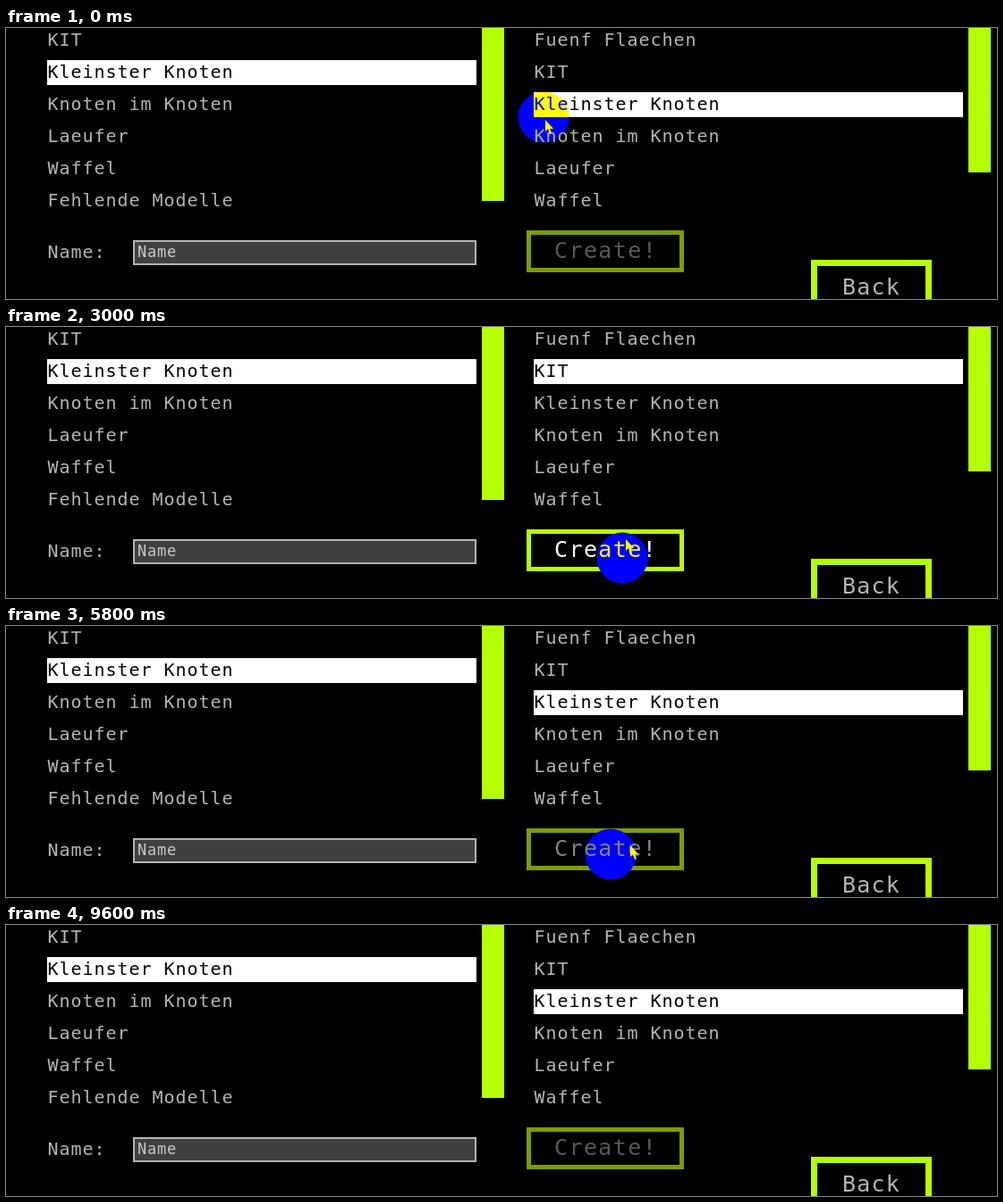
An HTML page with a canvas for the animation above (9.7 s loop, 1108x304 px).

```html
<!DOCTYPE html>
<html lang="de">
<head>
<meta charset="utf-8">
<style>
  html, body { margin: 0; width: 100%; height: 100%; overflow: hidden; background: #000; }
  canvas { display: block; }
</style>
</head>
<body>
<canvas id="stage" width="1108" height="304"></canvas>
<script>
const ctx = document.getElementById('stage').getContext('2d');
const LOOP = 9700, STEP = 100, ROW = 36, BAR = 28;
const LIME = '#b4ff00', DIM_LIME = '#7c9c00', GRAY = '#b4b4b4';
const MODELS = ['Fuenf Flaechen', 'KIT', 'Kleinster Knoten', 'Knoten im Knoten', 'Laeufer', 'Waffel', 'Fehlende Modelle'];

// Each click toggles the right list between "Kleinster Knoten" and "KIT"
const CLICKS = [900, 1900, 2400, 4800];

// Pointer stops: time, x, y
const STOPS = [
  [-100, 601, 100], [0, 603, 103], [900, 612, 50], [1800, 638, 88], [1900, 638, 91],
  [2400, 608, 46], [2900, 689, 259], [3000, 693, 238], [4000, 689, 244], [4100, 692, 252],
  [4800, 612, 87], [5700, 676, 256], [5800, 698, 246], [8000, 699, 270], [8100, 700, 244],
  [9300, 672, 345]
];

// Eases between stops; on long legs the pointer also circles about once a second
function pointerAt(t) {
  const i = STOPS.findIndex(stop => stop[0] > t);
  if (i < 0) return STOPS[STOPS.length - 1].slice(1);
  const [t0, x0, y0] = STOPS[i - 1], [t1, x1, y1] = STOPS[i];
  const u = (t - t0) / (t1 - t0), e = u * u * (3 - 2 * u);
  const turn = 2 * Math.PI * Math.floor((t1 - t0) / 1000) * u;
  return [
    x0 + (x1 - x0) * e - 25 * (1 - Math.cos(turn)),
    y0 + (y1 - y0) * e - 28 * Math.sin(turn)
  ];
}

function rect(x, y, w, h, color) {
  ctx.fillStyle = color;
  ctx.fillRect(x, y, w, h);
}

function frame(x, y, w, h, border, color, fill = '#000') {
  rect(x, y, w, h, color);
  rect(x + border, y + border, w - 2 * border, h - 2 * border, fill);
}

function label(text, x, y, color, size = 20, spacing = 0.96) {
  ctx.font = `${size}px "DejaVu Sans Mono", monospace`;
  ctx.letterSpacing = spacing + 'px';
  ctx.fillStyle = color;
  ctx.fillText(text, x, y);
}

function list(items, x, selected, hovered) {
  items.forEach((item, i) => {
    if (i === selected) rect(x, ROW * i, 480, BAR, '#fff');
    label(item, x + 0.5, ROW * i + 20, i === selected ? '#000' : i === hovered ? '#fff' : GRAY);
  });
}

function disc(x, y, r, color) {
  ctx.beginPath();
  ctx.arc(x, y, r, 0, 2 * Math.PI);
  ctx.fillStyle = color;
  ctx.fill();
}

function ring(x, y) {
  ctx.beginPath();
  ctx.arc(x, y, 6, 0, 2 * Math.PI);
  ctx.strokeStyle = '#f00';
  ctx.lineWidth = 2.5;
  ctx.stroke();
}

function arrow(x, y) {
  ctx.fillStyle = '#ff0';
  ctx.fill(new Path2D(`M${x} ${y}v13l3-3 2 6 2-1-2-5h4z`));
}

function draw(t) {
  const [x, y] = pointerAt(t), [haloX, haloY] = pointerAt(t - STEP);
  const visible = t < 9300;
  const kitSelected = CLICKS.filter(click => click < t).length % 2 === 1;
  const hovered = y % ROW < BAR ? Math.floor(y / ROW) : -1;
  const onCreate = x > 582 && x < 758 && y > 227 && y < 274;

  rect(0, 0, 1108, 304, '#000');
  rect(532, 0, 25, 194, LIME);
  rect(1076, 0, 25, 162, LIME);
  frame(142, 238, 384, 28, 2, GRAY, '#404040');
  frame(582, 227, 176, 47, 5, kitSelected ? LIME : DIM_LIME);
  frame(900, 260, 135, 60, 7, LIME);

  // The halo hides the frames but inverts the blue of the text and bars
  if (visible) disc(haloX, haloY, 28.5, '#000');

  list(MODELS.slice(1), 46, 1);
  list(MODELS.slice(0, 6), 590, kitSelected ? 1 : 2, hovered);
  label('Name:', 46.5, 258, GRAY);
  label('Name', 147, 257, '#c8c8c8', 17, 0.8);
  const createColor = kitSelected ? (onCreate ? '#fff' : GRAY) : (onCreate ? '#808080' : '#585858');
  label('Create!', 613, 258, createColor, 25, 1.4);
  label('Back', 935, 299, GRAY, 25, 1.2);

  if (!visible) return;
  ctx.globalCompositeOperation = 'difference';
  disc(haloX, haloY, 28.5, '#00f');
  ctx.globalCompositeOperation = 'source-over';
  if (CLICKS.includes(t)) ring(x + 1, y - 2);
  arrow(x, y);
}

function tick() {
  draw(Math.floor(performance.now() % LOOP / STEP) * STEP);
  requestAnimationFrame(tick);
}
tick();
</script>
</body>
</html>
```
